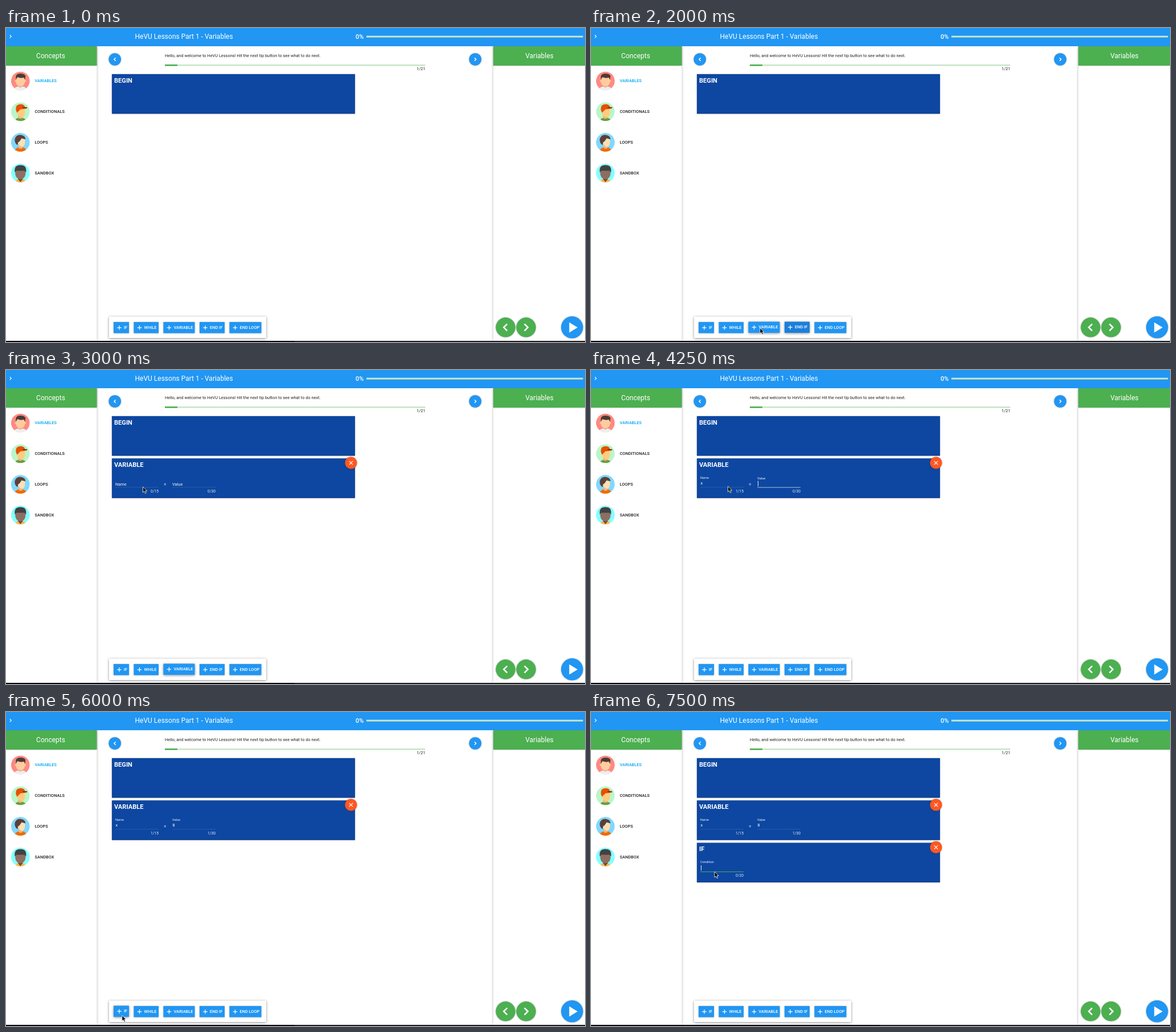
These frames come from a looping animation (1017x551 px, 8 s). An HTML page:

```html
<!DOCTYPE html>
<html lang="en">
<head>
<meta charset="utf-8">
<title>Variables lesson</title>
<style>
  html, body { margin: 0; width: 100%; height: 100%; overflow: hidden; background: #fff; }
  svg { display: block; width: 1017px; height: 551px; font-family: Roboto, sans-serif; }
  text { white-space: pre; }
  .panel { filter: drop-shadow(0 0 2px rgba(0,0,0,.3)); }
  .flat { filter: drop-shadow(0 .7px 1px rgba(0,0,0,.35)); }
  .raised { filter: drop-shadow(0 1.8px 2px rgba(0,0,0,.45)); }
</style>
</head>
<body>
<svg viewBox="0 0 1017 551">
  <defs><clipPath id="disc"><circle r="16.5"/></clipPath></defs>
  <g id="page"></g>
  <g id="live"></g>
</svg>
<script>
const STEP = 250, STEPS = 32;
const BLUE = '#2196f3', GREEN = '#4caf50', PALE = '#c8e6c9', NAVY = '#0d47a1', INK = '#212121';
const page = document.getElementById('page'), live = document.getElementById('live');

const rect = (x, y, w, h, fill, extra = '') =>
  `<rect x="${x}" y="${y}" width="${w}" height="${h}" fill="${fill}" ${extra}/>`;
const circle = (x, y, r, fill, extra = '') =>
  `<circle cx="${x}" cy="${y}" r="${r}" fill="${fill}" ${extra}/>`;
const text = (x, y, size, str, fill = '#fff', extra = '') =>
  `<text x="${x}" y="${y}" font-size="${size}" fill="${fill}" ${extra}>${str}</text>`;
const shape = (d, fill) => `<path d="${d}" fill="${fill}"/>`;
const line = (d, width, color = '#fff') =>
  `<path d="${d}" fill="none" stroke="${color}" stroke-width="${width}"/>`;
const chevron = (x, y, size, width, dir) =>
  line(`M${x - dir * size / 2} ${y - size}l${dir * size} ${size}l${-dir * size} ${size}`, width);
const medium = 'font-weight="500"', bold = 'font-weight="700"';
const centered = 'text-anchor="middle"', rightAligned = 'text-anchor="end"';

const avatars = [
  ['VARIABLES', '#ff8a80',
    shape('M-12 17Q-11 10-3 9.5H3Q11 10 12 17z', '#eceff1') +
    shape('M-3 5H3V10Q0 13-3 10z', '#f2b184') +
    shape('M-8-6H8V0Q8 9 0 9T-8 0z', '#ffcc9f') +
    circle(-8, 0, 1.8, '#ffcc9f') + circle(8, 0, 1.8, '#ffcc9f') +
    shape('M-8-2V-8Q-7-13 0-13Q7-13 9-9L8-2L6-6Q0-4-5-7z', '#4e3a37')],
  ['CONDITIONALS', '#b9f6ca',
    shape('M-9 17Q-9 11-3 11H4Q9 12 10 17z', '#689f38') +
    shape('M-4 4H4V11Q0 14-4 11z', '#f2b184') +
    shape('M-7-5H8V4Q7 10 1 10Q-7 8-7-5z', '#ffcc80') +
    shape('M-8-3Q-9-13 0-13Q7-13 8-8L12-8Q13-5 8-5L0-4L-6 2z', '#e65100') +
    line('M4-7H11', 1.4, '#4e342e')],
  ['LOOPS', '#80d8ff',
    shape('M-11 17Q-9 10-3 9H4Q10 10 11 17z', '#ef6c00') +
    shape('M-3 3H4V10Q0 13-3 10z', '#f2b184') +
    shape('M-5-6H8V1Q7 8 2 8Q-5 6-5-6z', '#ffe0b2') +
    shape('M-10-4Q-9-13 0-13Q9-12 9-5L2-7Q-1-1-4 0L-5 5Q-10 2-10-4z', '#5d4037')],
  ['SANDBOX', '#84ffff',
    shape('M-9 17Q-8 11-3 10H3Q8 11 9 17z', '#ffb74d') +
    shape('M-4 4H4V11L0 16L-4 11z', '#6d4c41') +
    shape('M-9-5H9V2Q8 10 0 11Q-8 10-9 2z', '#8d6e63') +
    shape('M-10-1V-7Q-9-14 0-14T10-7V-1L7-4H-7z', '#424242')]
];

const buttons = [['IF', 189, 27], ['WHILE', 224.5, 43.5], ['VARIABLE', 276.5, 55],
  ['END IF', 340, 44], ['END LOOP', 392.5, 56]];

const sidePanel = (x, w, title, middle) =>
  rect(x, 32, w, 517, '#fff', 'class="panel"') + rect(x, 32, w, 34, GREEN, 'class="flat"') +
  text(middle, 53, 12, title, '#fff', centered);

const roundButton = (x, y, r, fill, icon) => circle(x, y, r, fill, 'class="flat"') + icon;

page.innerHTML =
  rect(0, 0, 1017, 551, '#fff') +
  sidePanel(0, 159.5, 'Concepts', 78.5) + sidePanel(856, 161, 'Variables', 937) +
  rect(0, 0, 1017, 32, BLUE) + chevron(8, 14.7, 2.6, 1.2, 1) +
  text(226.5, 19, 12, 'HeVU Lessons Part 1 - Variables') +
  text(614, 19, 11, '0%', '#fff', medium) + rect(633, 13.6, 380.5, 3, PALE) +
  avatars.map(([name, color, figure], i) =>
    `<g transform="translate(25.3 ${93 + i * 53.8})" clip-path="url(#disc)">${circle(0, 0, 16.5, color)}${figure}</g>` +
    text(50.5, 94.8 + i * 53.9, 7.4, name, i ? INK : '#03a9f4', medium)).join('') +
  text(279, 51, 7.4, 'Hello, and welcome to HeVU Lessons! Hit the next tip button to see what to do next.', INK) +
  rect(279, 64, 457.5, 2.6, PALE) + rect(279, 64, 22, 2.6, GREEN) +
  text(736.7, 73.8, 7.4, '1/21', INK, rightAligned) +
  roundButton(191.2, 55, 10.8, BLUE, chevron(191.3, 55, 2.8, 1.4, -1)) +
  roundButton(824.2, 55, 10.8, BLUE, chevron(824.3, 55, 2.8, 1.4, 1)) +
  roundButton(877.5, 525.3, 17.2, GREEN, chevron(877.3, 525.3, 6, 2.6, -1)) +
  roundButton(913.5, 525.3, 17.2, GREEN, chevron(913.6, 525.3, 6, 2.6, 1)) +
  roundButton(994.3, 525.3, 19.3, BLUE, shape('M989.3 516.4V534.4L1004 525.4z', '#fff')) +
  rect(181, 506.5, 276, 37.5, '#fff', 'class="raised"') +
  rect(0, 549, 507, 2, '#000') + rect(507, 549, 510, 2, '#1c1c1c');

// Pointer waypoints: step, x, y
const route = [[1, 211, 396], [5, 272, 526], [7, 356, 526], [8, 296.8, 526.5], [10, 296.8, 526.5],
  [11, 285, 440], [12, 240.5, 205], [14, 240.5, 204], [18, 240.5, 204], [20, 160, 344], [21, 158, 390],
  [23, 195, 510], [24, 203.8, 532.5], [27, 203.8, 532.5], [28, 212, 380], [29, 217, 280.3], [32, 217, 280.3]];

function pointerAt(step) {
  const next = route.findIndex(p => p[0] > step);
  if (next < 1) return null;
  const [s0, x0, y0] = route[next - 1], [s1, x1, y1] = route[next];
  const k = (step - s0) / (s1 - s0);
  return [x0 + (x1 - x0) * k, y0 + (y1 - y0) * k];
}

function block(y, title, content = '', closable = true) {
  const close = closable
    ? circle(606, y + 7.8, 10.6, '#ff5722', 'class="flat"') +
      line(`M602.8 ${y + 4.6}l6.4 6.4m0-6.4l-6.4 6.4`, 1.2)
    : '';
  return rect(186, y, 427, 69.3, NAVY, 'class="flat"') + rect(186, y + 68.3, 427, 1, '#0a3a88') +
    text(190, y + 14.7, 11.1, title, '#fff', bold) + content + close;
}

// Text input whose label floats up on focus; it gets focus, a value and blur at given steps
function field(step, x, y, label, max, focusAt, value = '', typeAt = 99, blurAt = 99) {
  const focused = step >= focusAt && step < blurAt;
  const typed = step >= typeAt ? value : '';
  const lift = step < focusAt ? 0 : step === focusAt ? .9 : 1;
  const caretX = x + 1.4 + typed.length * 4;
  const rule = !focused ? 'rgba(255,255,255,.17)' : step === focusAt ? '#a9c4d8' : GREEN;
  return text(x, y + 47.3 - 12 * lift, 7.4 - 1.8 * lift, label, '#f0f4fa') +
    text(x + .5, y + 46, 7.4, typed) +
    rect(x, y + 50.3, 76, focused ? 1 : .7, rule) +
    (focused && (step - focusAt) % 4 < 2 ? rect(caretX - .4, y + 39.3, .9, 9.4, '#fff') : '') +
    text(x + 76, y + 59.3, 6.7, `${typed.length}/${max}`, '#e4ebf5', rightAligned);
}

function button([label, x, w], raised, fill) {
  const y = raised ? 515.4 : 516;
  return `<g class="${raised ? 'raised' : 'flat'}">${rect(x, y, w, 19.5, fill)}</g>` +
    line(`M${x + 6.2} ${y + 9.8}h7.6m-3.8-3.8v7.6`, 1.2) +
    text(x + 18, y + 12, 7.4, label, '#fff', medium);
}

function draw(step) {
  const pointer = pointerAt(step);
  const within = (a, b) => step >= a && step < b;
  let out = block(81, 'BEGIN', '', false);
  if (step >= 9) out += block(155.2, 'VARIABLE',
    field(step, 192, 155.2, 'Name', 15, 13, 'x', 15, 17) +
    text(277.2, 203.2, 7.4, '=', '#fff', medium) +
    field(step, 292, 155.2, 'Value', 30, 17, '8', 19, 24));
  if (step >= 25) out += block(229.6, 'IF', field(step, 192, 229.6, 'Condition', 20, 29));

  out += buttons.map((b, i) => {
    const hovered = pointer && pointer[1] > 516 && pointer[1] < 536 &&
      pointer[0] > b[1] && pointer[0] < b[1] + b[2];
    const focused = i === 2 ? within(8, 13) : i === 0 && within(24, 29);
    const fading = i === 3 && step === 8;
    return button(b, hovered || focused || fading, fading ? '#1a7fdc' : BLUE);
  }).join('');

  if (pointer) out += `<path transform="translate(${pointer})" d="M0 0V9.8L2.3 7.8L4 11.5L5.7 10.8L4.1 7.1H7.2z"
    fill="#000" stroke="#fff" stroke-width=".8"/>`;
  live.innerHTML = out;
}

let shown = -1;
function tick() {
  const step = Math.floor(performance.now() / STEP) % STEPS;
  if (step !== shown) draw(shown = step);
  requestAnimationFrame(tick);
}
tick();
</script>
</body>
</html>
```
